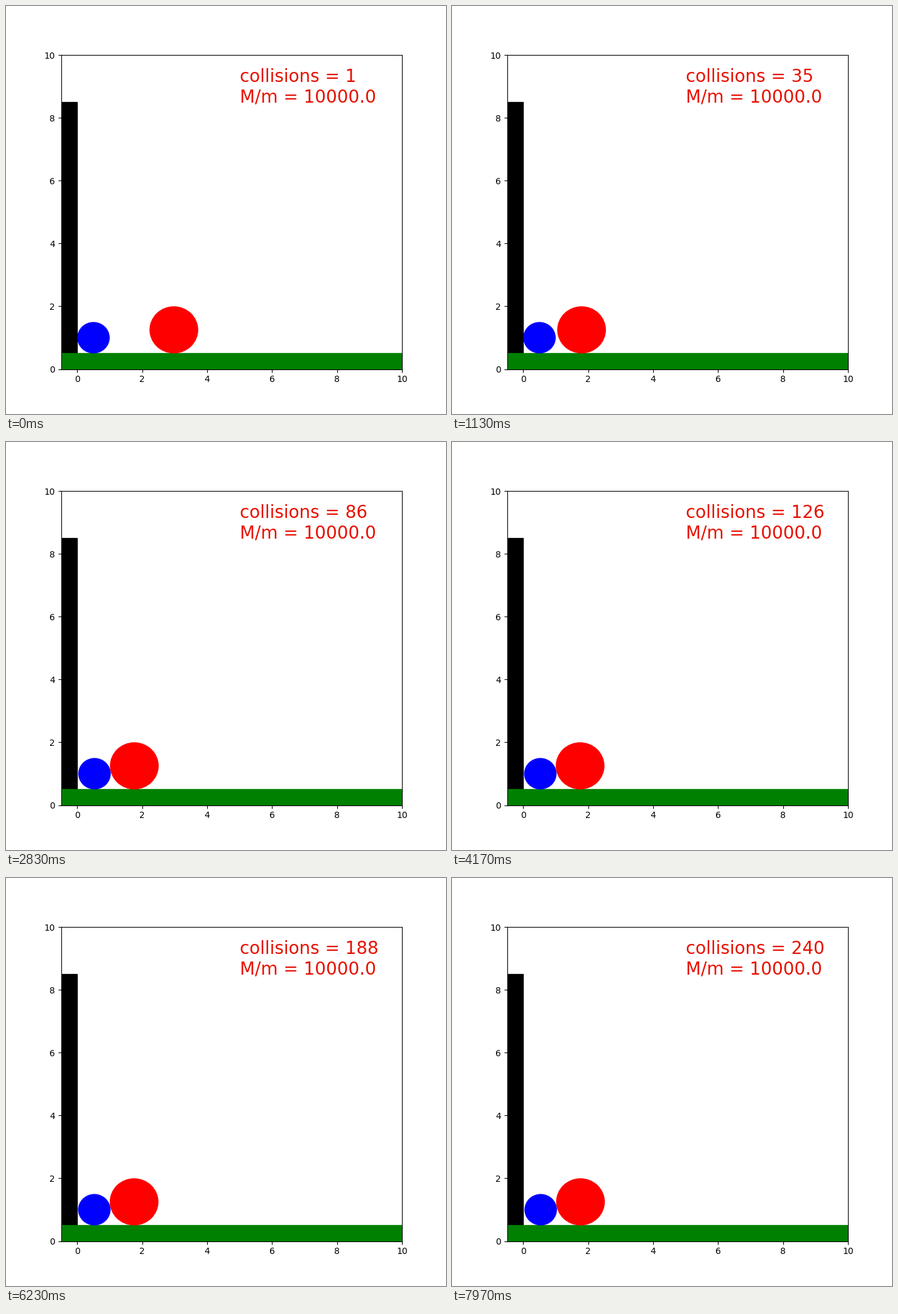
Recreate the animation shown at these times as a matplotlib script. Size 700 by 650 pixels, loop 8 s.

```python
import math

import matplotlib.pyplot as plt
from matplotlib.animation import FuncAnimation
from matplotlib.patches import Circle, Rectangle

HITS = 240
LOOP_MS = 8000
TICK_MS = 20
LEAD_MS = 14             # a collision shows on the tick nearest to it

RATIO = 10000.0          # mass of the big ball over the small one
GROUND = 0.5
R_SMALL, R_BIG = 0.5, 0.75
START_GAP = 2.5          # first distance of the small ball from the wall

# Horizontal distance of the centres when the balls touch on the ground
CONTACT = math.sqrt((R_SMALL + R_BIG) ** 2 - (R_BIG - R_SMALL) ** 2)
THETA = math.atan(1 / math.sqrt(RATIO))


def positions(hit):
    """Centres of both balls at a collision: odd hits the wall, even the ball."""
    # In mass-scaled coordinates the motion is a straight line across
    # a fan of mirrored wedges, each of angle THETA.
    reach = START_GAP / math.sin((hit + 1) * THETA)
    on_wall = hit % 2 == 1
    angle = 0 if on_wall else THETA
    small = R_SMALL + reach * math.sin(angle)
    big = R_SMALL + CONTACT + reach * math.cos(angle) / math.sqrt(RATIO)
    return small, big


fig = plt.figure(figsize=(7, 6.5), dpi=100)
ax = fig.add_subplot(xlim=(-0.5, 10), ylim=(0, 10))
ax.add_patch(Rectangle((-0.5, GROUND), 0.5, 8, color="black"))
ax.add_patch(Rectangle((-0.5, 0), 10.5, GROUND, color="green"))
small_ball = ax.add_patch(Circle((0, GROUND + R_SMALL), R_SMALL, fc="blue"))
big_ball = ax.add_patch(Circle((0, GROUND + R_BIG), R_BIG, fc="red"))
label = ax.text(5, 8.5, "", fontsize=20, color="#e81000")


def update(frame):
    hit = 1 + (frame * TICK_MS + LEAD_MS) * HITS // LOOP_MS
    small, big = positions(hit)
    small_ball.center = small, GROUND + R_SMALL
    big_ball.center = big, GROUND + R_BIG
    label.set_text(f"collisions = {hit}\nM/m = {RATIO}")
    return small_ball, big_ball, label


anim = FuncAnimation(fig, update, frames=LOOP_MS // TICK_MS, interval=TICK_MS,
                     init_func=lambda: update(0), repeat=True)
plt.show()
```
